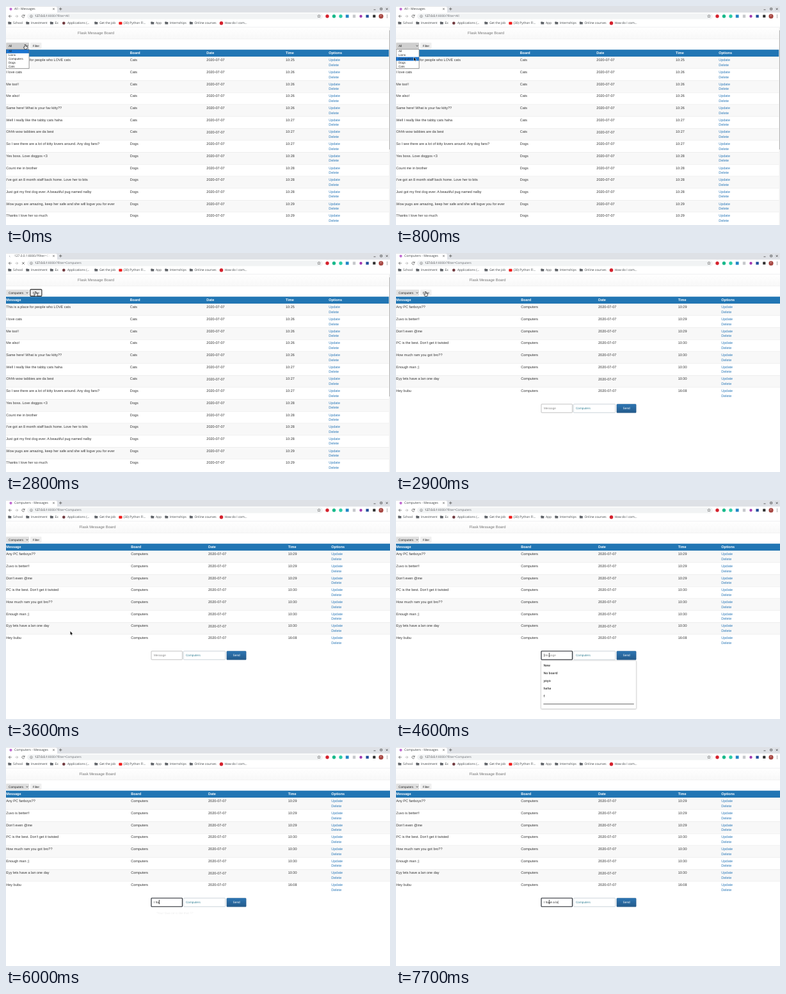
Animation, 600 px wide and 342 px high, one loop 8 s. Source, as an HTML page with a canvas:

```html
<!DOCTYPE html>
<html lang="en">
<head>
<meta charset="utf-8">
<title>Message board</title>
<style>
html, body { margin: 0; width: 100%; height: 100%; overflow: hidden; background: #fff; }
canvas { display: block; width: 600px; height: 342px; }
</style>
</head>
<body>
<canvas id="stage"></canvas>
<script>
const W = 600, H = 342, LOOP = 8000, STEP = 100;
const canvas = document.getElementById('stage');
const ctx = canvas.getContext('2d');
const dpr = window.devicePixelRatio || 1;
canvas.width = W * dpr;
canvas.height = H * dpr;

const PAGE_FONT = '"Liberation Sans", Arial, sans-serif';
const UI_FONT = '"Open Sans", "Noto Sans", sans-serif';
const ROW_TOP = 79, ROW_H = 18.67;
const LIST_TOP = 68, OPTION_H = 5.85;
const LINK = '#2a78b8', HEAD = '#2176b4';

// Moments of the hard changes
const PICK = 1300, SUBMIT = 2700, LOADING = 2800, LOADED = 2900, FOCUS = 4400, HISTORY = 4600;

const allRows = [
  ['This is a place for people who LOVE cats', 'Cats', '10:25'],
  ['I love cats', 'Cats', '10:26'],
  ['Me too!!', 'Cats', '10:26'],
  ['Me also!', 'Cats', '10:26'],
  ['Same here! What is your fav kitty??', 'Cats', '10:26'],
  ['Well I really like the tabby cats haha', 'Cats', '10:27'],
  ['Ohhh wow tabbies are da best', 'Cats', '10:27'],
  ['So I see there are a lot of kitty lovers around. Any dog fans?', 'Dogs', '10:27'],
  ['Yes boss. Love doggos <3', 'Dogs', '10:28'],
  ['Count me in brother', 'Dogs', '10:28'],
  ["I've got an 8 month staff back home. Love her to bits", 'Dogs', '10:28'],
  ['Just got my first dog ever. A beautiful pug named nalby', 'Dogs', '10:28'],
  ['Wow pugs are amazing, keep her safe and she will logve you for ever', 'Dogs', '10:29'],
  ['Thanks I love her so much', 'Dogs', '10:29']
];
const pcRows = [
  ['Any PC fanboys??', '10:29'],
  ['Zuvo is better!!', '10:29'],
  ["Don't even @me", '10:29'],
  ["PC is the best. Don't get it twisted", '10:30'],
  ['How much ram you got bro??', '10:30'],
  ['Enough man ;)', '10:30'],
  ['Eyy lets have a lan one day', '10:30'],
  ['Hey bubu', '16:08']
].map(([msg, time]) => [msg, 'Computers', time]);

// Pointer path: time, x, y of the tip
const path = [
  [0, 30, 60.5], [200, 32, 65.5], [300, 32, 65.5], [800, 28, 80], [1200, 27, 82],
  [1600, 33, 78], [1700, 33, 78], [1800, 38, 69], [2500, 46.2, 60.8],
  [2900, 46.2, 60.8], [3500, 98, 200], [3600, 100.5, 205], [3800, 188, 238],
  [3900, 188, 238], [4400, 239.5, 242]
];
const typing = [
  [5200, 'I'], [5400, 'I '], [5700, 'I h'], [5900, 'I ha'], [6100, 'I hav'],
  [6300, 'I have'], [6500, 'I have '], [6700, 'I have a'],
  [7600, 'I have a l'], [7700, 'I have a la']
];

function rect(x, y, w, h, color) {
  ctx.fillStyle = color;
  ctx.fillRect(x, y, w, h);
}

function box(x, y, w, h, r, fill, stroke, lw = 0.5) {
  ctx.beginPath();
  ctx.roundRect(x, y, w, h, r);
  if (fill) { ctx.fillStyle = fill; ctx.fill(); }
  if (stroke) { ctx.strokeStyle = stroke; ctx.lineWidth = lw; ctx.stroke(); }
}

function dot(x, y, r, color) {
  ctx.beginPath();
  ctx.arc(x, y, r, 0, Math.PI * 2);
  ctx.fillStyle = color;
  ctx.fill();
}

function line(points, color, lw = 0.7) {
  ctx.beginPath();
  points.forEach(([x, y], i) => i ? ctx.lineTo(x, y) : ctx.moveTo(x, y));
  ctx.strokeStyle = color;
  ctx.lineWidth = lw;
  ctx.stroke();
}

// y is the vertical middle of the lowercase letters
function text(str, x, y, size, color = '#333', weight = 400, family = PAGE_FONT) {
  ctx.font = `${weight} ${size}px ${family}`;
  ctx.fillStyle = color;
  ctx.fillText(str, x, y + size * 0.34);
}

const ui = (str, x, y, size = 4.9, color = '#3c4043', weight = 400) =>
  text(str, x, y, size, color, weight, UI_FONT);

function cross(x, y, r, color) {
  line([[x - r, y - r], [x + r, y + r]], color);
  line([[x - r, y + r], [x + r, y - r]], color);
}

function tabStrip(title, loading, t) {
  rect(0, 0, W, 10.5, '#dee1e6');
  box(0, 1, 80, 12, [0, 3, 0, 0], '#fff');
  if (loading) {
    const a = 4 + t / 120;
    ctx.beginPath();
    ctx.arc(7.5, 4.8, 2, a, a + 1.2);
    ctx.strokeStyle = '#8a9099';
    ctx.lineWidth = 0.7;
    ctx.stroke();
    const fade = ctx.createLinearGradient(58, 0, 69, 0);
    fade.addColorStop(0, '#3c4043');
    fade.addColorStop(1, 'rgba(60,64,67,0)');
    ui('127.0.0.1:8000/?filter=Com', 13, 4.6, 4.9, fade);
  } else {
    dot(7.5, 4.8, 2.1, '#c06ad0');
    ui(title, 13, 4.6, 5);
  }
  cross(74.5, 4.6, 1.3, '#444');
  line([[83, 4.6], [87.4, 4.6]], '#444');
  line([[85.2, 2.4], [85.2, 6.8]], '#444');
  line([[574.5, 5.8], [577.5, 5.8]], '#333');
  box(584.8, 3.2, 2.8, 2.8, 0, null, '#333', 0.7);
  cross(595.2, 4.7, 1.5, '#333');
}

function arrow(x, dir, color) {
  line([[x - 2.2 * dir, 16], [x + 2.2 * dir, 16]], color);
  line([[x, 13.8], [x + 2.2 * dir, 16], [x, 18.2]], color);
}

function star(x, y, r) {
  const pts = Array.from({ length: 11 }, (_, i) => {
    const a = i * Math.PI / 5 - Math.PI / 2, d = i % 2 ? r * 0.45 : r;
    return [x + d * Math.cos(a), y + d * Math.sin(a)];
  });
  line(pts, '#555', 0.5);
}

function toolbar(query, loading) {
  rect(0, 10.5, W, 22.5, '#fff');
  arrow(6.5, -1, '#444');
  arrow(16.5, 1, '#aaa');
  if (loading) cross(27, 16, 1.8, '#444');
  else {
    ctx.beginPath();
    ctx.arc(27, 16, 2.1, 0.5, 5.7);
    ctx.strokeStyle = '#444';
    ctx.lineWidth = 0.7;
    ctx.stroke();
    line([[29.1, 13.4], [29.1, 15.4], [27.2, 15.4]], '#444');
  }
  box(33, 11.8, 462, 8.8, 4.4, '#f1f3f4');
  ctx.beginPath();
  ctx.arc(39.5, 16, 1.9, 0, 7);
  ctx.strokeStyle = '#555';
  ctx.lineWidth = 0.5;
  ctx.stroke();
  line([[39.5, 15.6], [39.5, 17.1]], '#555', 0.5);
  ui('127.0.0.1', 45, 15.8, 4.7, '#202124');
  const hostEnd = 45 + ctx.measureText('127.0.0.1').width;
  ui(':8000/?filter=' + query, hostEnd, 15.8, 4.7, '#5f6368');
  star(489, 16, 2.5);

  dot(502, 16, 2.7, '#d5202c');
  dot(512.5, 16, 2.7, '#18b98a');
  dot(523, 16, 2.7, '#2bcba8');
  box(530.8, 13.6, 4.8, 4.8, 0, '#2385c7');
  box(541.8, 13.6, 4.4, 4.8, 0, '#c6c8cb');
  dot(554.5, 16, 2.2, '#a23bb0');
  box(562.4, 13.8, 4.4, 4.4, 0, '#234f9c');
  box(573.2, 13.8, 4.2, 4.2, 0.6, '#333');
  dot(586, 16, 3.6, '#a5433e');
  ui('T', 584.8, 15.9, 4.2, '#fff');
  [14, 16, 18].forEach(y => dot(595.5, y, 0.55, '#444'));
}

function folder(x) {
  box(x - 2.4, 24.5, 2.6, 2, 0.5, '#5f6368');
  box(x - 2.4, 25.1, 4.9, 3.5, 0.5, '#5f6368');
}

function bookmarks() {
  [['School', 11], ['Investment', 39], ['Ex', 76.5], ['Get the job', 146],
   ['App', 234], ['Internships', 256], ['Online courses', 294.5]].forEach(([name, x]) => {
    folder(x - 5.2);
    ui(name, x, 26.8);
  });
  dot(90.3, 26.8, 2.3, '#703a3f');
  ui('Applications (…', 96, 26.8);
  box(176.3, 24.7, 5.2, 4.2, 1, '#f01d1d');
  ui('(30) Python Fl…', 183.5, 26.8);
  dot(336.5, 26.8, 2.8, '#d5202c');
  ui('How do I com…', 341.5, 26.8);
}

function navbar(x) {
  const g = ctx.createLinearGradient(0, 33, 0, 51);
  g.addColorStop(0, '#fff');
  g.addColorStop(1, '#f8f8f8');
  rect(0, 33, W, 18, g);
  rect(0, 32.8, W, 0.5, '#dcdee1');
  rect(0, 51, W, 0.5, '#e4e4e4');
  text('Flask Message Board', x, 41.7, 5.9, '#777');
}

function filterBar(value, open, selFocus, btnFocus) {
  box(0.2, 57.3, 35.8, 9.6, 0.8, open ? '#cfcfcf' : '#dfdfdf');
  text(value, 4, 62.3, 4.75, '#222');
  line([[31.7, 61.5], [33, 62.9], [34.3, 61.5]], '#222', 0.8);
  box(38, 57.3, 17.5, 9.6, 0.8, '#efefef');
  text('Filter', 41.8, 62.3, 4.65, '#222');
  if (selFocus) box(0.3, 56.9, 35.7, 10.5, 1.2, null, '#222', 1.1);
  if (btnFocus) box(37.8, 56.9, 18.1, 10.5, 1.2, null, '#222', 1.1);
}

function table(rows, cols, width) {
  const [cMsg, cBoard, cDate, cTime, cOpt] = cols;
  rect(0, 68.2, width, ROW_TOP - 68.2, HEAD);
  ['Message', 'Board', 'Date', 'Time', 'Options'].forEach((name, i) =>
    text(name, cols[i], 73.5, 5.5, '#fff', 700));
  rows.forEach(([msg, board, time], i) => {
    const top = ROW_TOP + i * ROW_H, y = top + 5.6;
    if (i % 2 === 0) rect(0, top, width, ROW_H, '#f8f8f8');
    rect(0, top, width, 0.4, '#ddd');
    text(msg, cMsg, y, 5.5);
    text(board, cBoard, y, 5.5);
    text('2020-07-07', cDate, y, 5.55);
    text(time, cTime, y, 5.5);
    text('Update', cOpt, y, 5.5, LINK);
    text('Delete', cOpt, y + 7.5, 5.5, LINK);
  });
}

function optionList(pointerY) {
  const active = Math.max(0, Math.floor((pointerY - LIST_TOP) / OPTION_H));
  rect(0, LIST_TOP - 0.4, 36.2, 5 * OPTION_H + 0.8, '#fff');
  rect(0, LIST_TOP + active * OPTION_H, 36, OPTION_H, '#1b74cf');
  box(0.2, LIST_TOP - 0.4, 35.9, 5 * OPTION_H + 0.8, 0, null, '#555', 0.6);
  ['All', 'Lions', 'Computers', 'Dogs', 'Cats'].forEach((name, i) =>
    text(name, 4, 70.7 + i * OPTION_H, 4.65, '#222'));
}

function popup(items, bottom) {
  ctx.save();
  ctx.shadowColor = 'rgba(0,0,0,0.3)';
  ctx.shadowBlur = 2 * dpr;
  ctx.shadowOffsetY = 0.6 * dpr;
  box(226.6, 251, 148.8, bottom - 251, 0.8, '#fff');
  ctx.restore();
  box(226.6, 251, 148.8, bottom - 251, 0.8, null, '#c4c4c4', 0.4);
  items.forEach((s, i) => ui(s, 230.5, 258.8 + i * 11.8, 4.9, '#222', 600));
}

function form(t) {
  const focus = t >= FOCUS;
  const last = typing.filter(([at]) => t >= at).pop();
  const value = last ? last[1] : '';
  box(227, 236, 48.5, 13.3, 0.8, '#fff', focus ? '#1b1f26' : '#9a9a9a', focus ? 1.1 : 0.6);
  if (value) text(value, 231, 242.4, 4.75, '#222');
  else text('Message', 231, 242.4, 4.65, '#888');
  if (focus && !(t >= 7300 && t < 7600)) {
    ctx.font = `400 4.75px ${PAGE_FONT}`;
    rect(231 + ctx.measureText(value).width, 239.9, 0.4, 5.2, '#222');
  }
  box(277.3, 236, 65.5, 13.3, 0.8, '#fff', '#a9b7c2', 0.6);
  text('Computers', 281, 242.4, 4.65, '#2f7f94');
  const g = ctx.createLinearGradient(0, 236, 0, 249.5);
  g.addColorStop(0, '#2e76b3');
  g.addColorStop(1, '#235a8b');
  box(344.9, 235.9, 30.3, 13.7, 1.2, g, '#245580', 0.4);
  text('Send', 354.6, 242.6, 4.75, '#fff');

  const hint = '"Your fave cat is like that ??"';
  if (t >= HISTORY && t < 5200) {
    popup(['New', 'No board', 'yoyo', 'hehe', 'f'], 326);
    rect(230.3, 318.3, 141.5, 0.8, '#444');
  } else if (t >= 5200 && t < 5400) {
    popup([hint], 267);
  } else if (t >= 5400 && t < 6100) {
    ctx.globalAlpha = 0.12;
    ui(hint, 235, 259, 4.5, '#555');
    ctx.globalAlpha = 1;
  }
}

function pointerAt(t) {
  const i = path.findIndex(k => k[0] > t);
  if (i < 0) return path[path.length - 1].slice(1);
  const [t0, x0, y0] = path[i - 1], [t1, x1, y1] = path[i];
  const p = (t - t0) / (t1 - t0);
  return [x0 + (x1 - x0) * p, y0 + (y1 - y0) * p];
}

function cursorShape(x, y, points, fill, stroke, lw) {
  ctx.beginPath();
  points.forEach(([dx, dy]) => ctx.lineTo(x + dx, y + dy));
  ctx.closePath();
  ctx.strokeStyle = stroke;
  ctx.lineWidth = lw;
  ctx.stroke();
  ctx.fillStyle = fill;
  ctx.fill();
}

function pointer(x, y) {
  const onButton = x < 55.5 && y < 67;
  const onInput = x > 227 && y > 236;
  if (onInput) {
    line([[x - 1.1, y - 2.8], [x + 1.1, y - 2.8]], '#222', 0.5);
    line([[x, y - 2.8], [x, y + 2.8]], '#222', 0.6);
    line([[x - 1.1, y + 2.8], [x + 1.1, y + 2.8]], '#222', 0.5);
  } else if (onButton) {
    cursorShape(x, y, [[-0.6, 0], [0.6, 0], [0.6, 2.4], [2.8, 2.9], [3, 5], [2.2, 6.4],
      [-0.8, 6.4], [-2.2, 4], [-1.6, 3.4], [-0.6, 4.2]], '#e8e8e8', '#111', 1.1);
  } else {
    cursorShape(x, y, [[0, 0], [0, 5.4], [1.2, 4.3], [2, 6.2], [2.9, 5.8],
      [2.1, 4], [3.7, 3.9]], '#111', '#fff', 0.9);
  }
}

function draw(t) {
  const loaded = t >= LOADED;
  const loading = t >= LOADING && !loaded;
  const open = t < PICK;
  const [px, py] = pointerAt(t);
  ctx.setTransform(dpr, 0, 0, dpr, 0, 0);
  ctx.textRendering = 'geometricPrecision';
  rect(0, 0, W, H, '#fff');
  tabStrip(loaded ? 'Computers - Messages' : 'All - Messages', loading, t);
  toolbar(t >= LOADING ? 'Computers' : 'All', loading);
  bookmarks();
  navbar(loaded ? 114.5 : 112);
  filterBar(open ? 'All' : 'Computers', open, !open && t < SUBMIT, t >= SUBMIT && !loaded);
  if (loaded) {
    table(pcRows, [0.3, 195.2, 316, 440.7, 508.3], W);
    form(t);
  } else {
    table(allRows, [0.3, 193.8, 313.3, 437, 504.2], 598.5);
    rect(598.5, 33, 1.5, H - 33, '#f1f1f1');
    rect(598.9, 38, 1.1, 186, '#b5b5b5');
    if (open) optionList(py);
  }
  pointer(px, py);
}

function frame() {
  const t = performance.now() % LOOP;
  draw(Math.floor(t / STEP) * STEP);
  requestAnimationFrame(frame);
}
frame();
</script>
</body>
</html>
```
